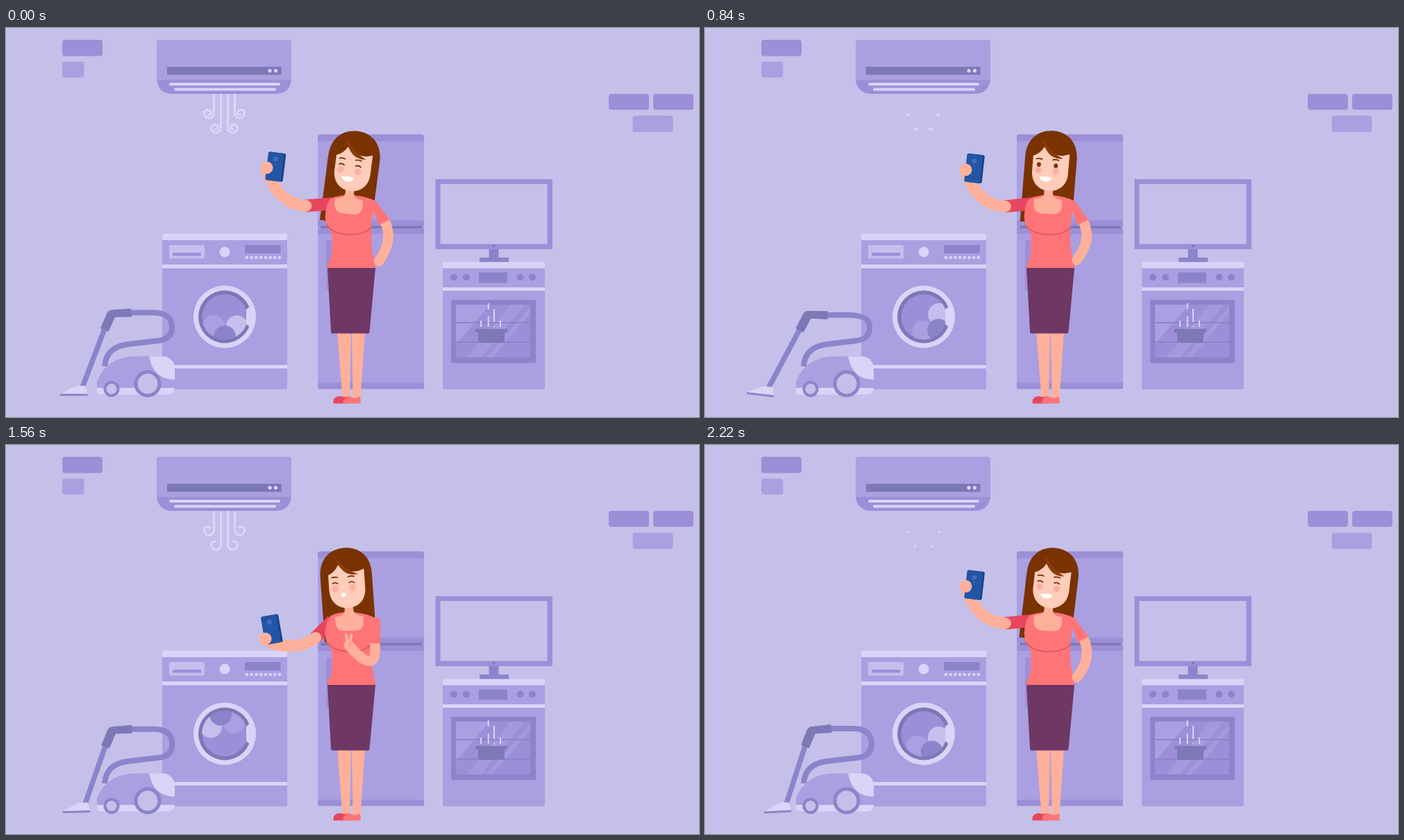
Write an HTML page that moves like this. It is 998 by 561 pixels and loops after 2.25 s.

```html
<!DOCTYPE html>
<html lang="en">
<head>
<meta charset="utf-8">
<title>Selfie at home</title>
<style>
  html, body { margin: 0; width: 100%; height: 100%; overflow: hidden; background: #c5c0e9; }
  svg { display: block; width: 100vw; height: 100vh; }
  .bg { fill: #c5c0e9; }
  .base { fill: #aa9fe1; }
  .mid { fill: #9c8fd8; }
  .deep { fill: #8c84cb; }
  .dark { fill: #7d78b6; }
  .pale { fill: #d9d4f8; }
  .skin { fill: #ffb09a; }
  .pink { fill: #ff7477; }
  .red { fill: #e8455f; }
  .hair { fill: #7a3200; }
  .line { fill: none; }
  .hose { stroke: #8c84cb; stroke-width: 8; }
  .limb { stroke: #ffb09a; stroke-linecap: round; }
  .air { stroke: #dbd7f8; stroke-width: 2.8; }
  .steam { stroke: #d9d4f8; stroke-width: 2; }
  .ink { stroke: #6e2c04; stroke-width: 1.7; stroke-linecap: round; }
</style>
</head>
<body>
<svg viewBox="0 0 998 561" preserveAspectRatio="none">
  <defs>
    <clipPath id="glass"><circle cx="315" cy="416.5" r="33"/></clipPath>
    <clipPath id="window"><rect x="648" y="399" width="107" height="76"/></clipPath>
    <linearGradient id="glow" gradientUnits="userSpaceOnUse" x1="10" y1="0" x2="75" y2="-8">
      <stop offset="0" stop-color="#fff" stop-opacity=".5"/>
      <stop offset=".75" stop-color="#fff" stop-opacity=".48"/>
      <stop offset="1" stop-color="#fff" stop-opacity="0"/>
    </linearGradient>
    <filter id="soft"><feGaussianBlur stdDeviation="1.3"/></filter>
    <path id="swirlOut" d="M299.5 95V123a7 7 0 0 1-14 0a5 5 0 0 1 10 0a3 3 0 0 1-5 1.5"/>
    <path id="swirlIn" d="M309.5 95V144a7 7 0 0 1-14 0a5 5 0 0 1 10 0a3 3 0 0 1-5 1.5"/>
  </defs>

  <rect class="bg" width="998" height="561"/>

  <!-- bricks -->
  <g class="mid">
    <rect x="81" y="17" width="58" height="23.500" rx="4"/>
    <rect x="868" y="95" width="58" height="23" rx="4"/>
    <rect x="932" y="95" width="58" height="23" rx="4"/>
  </g>
  <g class="base">
    <rect x="81" y="48.500" width="31.500" height="23" rx="4"/>
    <rect x="902.500" y="126.500" width="58" height="23.500" rx="4"/>
  </g>

  <!-- air conditioner -->
  <path class="base" d="M217 76V21q0-4 4-4H407q4 0 4 4V76Z"/>
  <path class="mid" d="M217 75H411Q408 95 388 95H240Q220 95 217 75Z"/>
  <rect class="dark" x="232" y="56" width="164.500" height="11.500"/>
  <g class="pale">
    <circle cx="380" cy="61.700" r="2.600"/><circle cx="388.500" cy="61.700" r="2.600"/>
    <rect x="235" y="79" width="160" height="4" rx="2"/>
    <rect x="242" y="86.500" width="147" height="4" rx="2"/>
  </g>
  <g id="air" class="line air"></g>

  <!-- washing machine -->
  <rect class="base" x="225" y="304" width="180" height="217" rx="2"/>
  <g class="pale">
    <rect x="225" y="296.500" width="180" height="9.500" rx="2"/>
    <rect x="225" y="341" width="180" height="5.500"/>
    <rect x="225" y="486" width="180" height="5"/>
    <circle cx="315" cy="323" r="7.500"/>
  </g>
  <rect x="235" y="313" width="51" height="19.500" rx="2" fill="#c5bfee"/>
  <rect class="mid" x="240" y="324" width="41" height="4.500"/>
  <rect class="deep" x="344" y="313" width="51.500" height="12"/>
  <path class="line" d="M347 331H394" stroke="#d9d4f8" stroke-width="4.600" stroke-linecap="round" stroke-dasharray="0 6.700"/>
  <circle class="pale" cx="315" cy="416.500" r="45"/>
  <circle class="dark" cx="315" cy="416.500" r="38"/>
  <circle class="mid" cx="315" cy="416.500" r="32.500"/>
  <g clip-path="url(#glass)">
    <g id="drum">
      <circle class="base" cx="299" cy="430" r="16"/>
      <circle cx="332.500" cy="430.500" r="16" fill="#c5bfee"/>
      <circle class="deep" cx="315" cy="445" r="16"/>
    </g>
  </g>
  <path class="pale" d="M355 398L346 406V427L355 435Z"/>

  <!-- fridge -->
  <rect class="base" x="449" y="153.500" width="153" height="367" rx="3"/>
  <g class="mid">
    <path d="M449 163.500V157q0-3.500 3.500-3.500H598.500q3.500 0 3.500 3.500v6.500Z"/>
    <rect x="449" y="277.500" width="153" height="9" rx="2"/>
    <rect x="449" y="288.500" width="153" height="8.500" rx="2"/>
    <rect x="449" y="511.500" width="153" height="9" rx="2"/>
    <rect x="461" y="185" width="8" height="72" rx="3"/>
    <rect x="461" y="306" width="8" height="72" rx="3"/>
  </g>
  <rect class="dark" x="453" y="285.500" width="146" height="3.500"/>

  <!-- television -->
  <rect class="mid" x="618.500" y="218" width="168.500" height="101" rx="1"/>
  <rect class="bg" x="625.500" y="225" width="154" height="86.500"/>
  <circle class="dark" cx="702.500" cy="314.500" r="2"/>
  <rect class="deep" x="695.500" y="319" width="14" height="13"/>
  <rect class="deep" x="682" y="331" width="42" height="7"/>

  <!-- oven -->
  <rect class="base" x="629" y="345" width="147" height="176" rx="2"/>
  <rect class="pale" x="629" y="337.500" width="147" height="9" rx="2"/>
  <rect class="pale" x="629" y="374" width="147" height="5"/>
  <g class="deep">
    <circle cx="645" cy="359.500" r="5"/><circle cx="663" cy="359.500" r="5"/>
    <circle cx="740.500" cy="359.500" r="5"/><circle cx="758" cy="359.500" r="5"/>
    <rect x="681" y="352.500" width="41" height="15"/>
    <rect x="641" y="392" width="122" height="91" rx="2"/>
  </g>
  <rect class="mid" x="648" y="399" width="107" height="76"/>
  <g class="base" clip-path="url(#window)">
    <path d="M648 399H697L648 456Z"/>
    <path d="M727 399H747L684 475H664Z" opacity=".7"/>
    <path d="M755 402V411L701 475H692Z" opacity=".7"/>
  </g>
  <path class="line" d="M648 425H755M648 453H755" stroke="#8c84cb" stroke-width="2"/>
  <path class="dark" d="M676 434H722V439H718V450Q718 454 714 454H684Q680 454 680 450V439H676Z"/>
  <g id="steam" class="line steam">
    <path d="M684 431V412" stroke-dasharray="9 16"/>
    <path d="M694.700 431V397" stroke-dasharray="15 10"/>
    <path d="M703 431V405" stroke-dasharray="19 6" data-shift="-7"/>
    <path d="M712 431V412" stroke-dasharray="9 16"/>
  </g>

  <!-- vacuum cleaner -->
  <path id="hose" class="line hose"/>
  <path id="wand" class="line" stroke="#8c84cb" stroke-width="7.500"/>
  <path id="grip" class="dark" d="M180 404.500L152 406.500Q147 407 145 412L136 433L147.500 438L157 417L181 416.500Z"/>
  <g id="nozzle">
    <path class="pale" d="M78 528L101 516H114L118 528Z"/>
    <rect class="deep" x="78" y="527.500" width="39.500" height="3"/>
  </g>
  <path class="base" d="M131 521V509Q146 473.500 187 473.500H222Q243 475 243 496V521Z"/>
  <path class="pale" d="M131 519H243Q242 528.500 233 528.500H135Q131 528 131 524Z"/>
  <path class="pale" d="M206 473.500H226Q241 475 243 490V507Q212 507 206 473.500Z"/>
  <g class="bg" stroke="#8c84cb">
    <circle cx="204" cy="513" r="17" stroke-width="5"/>
    <circle cx="152" cy="520.500" r="9.500" stroke-width="4"/>
  </g>

  <!-- woman -->
  <g id="backHair"><path class="hair" d="M-37.500 37V-57C-37.500 -84 -20 -97 0 -97S37 -84 37 -57V6H0L-25 37Z"/></g>
  <path class="skin" d="M477 438H497L495 532Q489.500 536 484.500 532Z"/>
  <path class="skin" d="M498 438H517L510.500 532Q505 536 499.500 532Z"/>
  <path class="red" d="M471.500 541.500V539Q472 531 481 531Q488 533 494 531V541.500Z"/>
  <path class="pink" d="M485.500 541.500Q485 531.500 496 531.500Q503 536 510 531L511 541.500Z"/>
  <path id="sleeveL" class="line" stroke="#e8455f" stroke-width="18"/>
  <path class="pink" d="M468 246Q478 241 494 241T527 247Q533 252 528 270Q527 281 526 290L526.500 316L532.500 347H463V342Q470 329 469.500 318V297Q458 283 460 268Q461 252 468 246Z"/>
  <path class="line" d="M462 284Q470 297 495 298Q518 298 526 287" stroke="#dd5765" stroke-width="1.800"/>
  <path id="neckline" class="skin" d="M474 247Q488 246 488 238V226H500.500V238Q501 246 514 247Q517 268 503 268H485Q472 267 474 247Z"/>
  <path d="M463 346H532L523.500 438Q523 440.500 521 440.500H470Q468 440.500 468 438Z" fill="#6f3764"/>
  <g id="head">
    <path d="M-26 -59Q-16 -63 -11 -73Q-3 -62 16 -62L26 -65V-37C26 -20 14 -10 0 -10S-26 -20 -26 -37Z" fill="#ffcdb9"/>
    <path d="M-16 -89Q-5 -67 17 -58Q4 -56 -4 -64Q-13 -73 -16 -89Z" fill="#8a3c08"/>
    <circle cx="-17.200" cy="-39" r="4.700" fill="#ffada0"/>
    <circle cx="7.800" cy="-39" r="4.700" fill="#ffada0"/>
    <path class="line ink" d="M-21 -55Q-17 -56.500 -13 -55M2.500 -55Q6.500 -56.500 11 -55"/>
    <path id="shut" class="line ink" d="M-20.500 -46.500Q-17 -49 -13 -46M3.500 -46.500Q7 -49 11 -46"/>
    <g id="eyes" class="hair">
      <ellipse cx="-17" cy="-47" rx="3"/>
      <ellipse cx="7.500" cy="-47" rx="3"/>
    </g>
    <path id="mouth" fill="#fff"/>
  </g>
  <path id="armR" class="line limb" stroke-width="14.500"/>
  <path id="fingers" class="line limb" stroke-width="4.300"/>
  <path id="thumb" class="line" stroke="#ef957f" stroke-width="1.200" stroke-linecap="round" d="M-3 -1L2 -3L2 2"/>
  <path id="sleeveR" class="pink"/>
  <path id="armL" class="line limb" stroke-width="16.500"/>
  <g id="phone">
    <path id="beam" d="M10 -19L62 -67L82 -30L80 42L10 20Z" fill="url(#glow)" filter="url(#soft)"/>
    <rect x="-12" y="-20.500" width="25" height="41" rx="2.500" fill="#173f80"/>
    <rect x="-12.500" y="-20.500" width="23" height="41" rx="2.500" fill="#2355a5"/>
    <circle cx="-1" cy="-11" r="3.500" fill="#3f6dc0"/>
    <circle cx="-1" cy="-4" r="1" fill="#3f6dc0"/>
  </g>
  <circle id="hand" class="skin" r="9"/>
</svg>
<script>
const LOOP = 2250, STEP = 30;
const el = id => document.getElementById(id);
const set = (node, attrs) => { for (const k in attrs) node.setAttribute(k, attrs[k]); };
const clamp = x => Math.min(1, Math.max(0, x));
const ramp = (t, a, b) => clamp((t - a) / (b - a));
const ease = (t, a, b) => { const s = ramp(t, a, b); return s * s * (3 - 2 * s); };
const mix = (a, b, p) => a + (b - a) * p;
const pulse = (t, a, b, c, d) => ramp(t, a, b) - ramp(t, c, d);
const blend = (a, b, p) => a.map((v, i) => mix(v, b[i], p));
const curve = n => `M${n[0]} ${n[1]}C${n.slice(2)}`;

// two poses: phone held high with hand on hip / phone low with a peace sign
const armL = [[376, 203, 386, 240, 408, 255, 432, 256.5], [374, 281, 395, 293, 425, 294, 446, 278]];
const armR = [[544, 276, 555, 295, 552, 315, 537, 336.5], [531, 283, 535, 318, 522, 322, 494, 289]];
const cuffL = [[431, 256.5, 474, 253], [444, 279.5, 470, 253]];
const cuffR = [[524, 250, 534, 246, 552.5, 276, 537, 284.5], [524, 250, 539, 247, 539, 286, 524, 286]];
const wandX = [0, 7.5, -22, 7, 0, 7.5];

for (const id of ['swirlOut', 'swirlIn'])
  for (const flip of ['', 'matrix(-1 0 0 1 629 0)']) {
    const p = el(id).cloneNode();
    p.removeAttribute('id');
    set(p, { pathLength: 100, transform: flip });
    el('air').append(p);
  }

function drawAir(t) {
  const c = t % 1350;
  const end = t < 1350 ? 100 : 100 * ease(t, 1350, 1620);
  const start = Math.min(99.2, 100 * ease(c, 240, 960));
  const len = Math.max(0, end - start);
  for (const p of el('air').children)
    set(p, { 'stroke-dasharray': `0 ${start} ${len} 200`, visibility: len ? 'visible' : 'hidden' });
}

function drawSteam(t) {
  const rise = 25 * ease(t, 0, 760);
  for (const p of el('steam').children)
    set(p, { 'stroke-dashoffset': +(p.dataset.shift || 0) - rise });
}

function drawVacuum(t) {
  const i = Math.floor(t / 450), d = mix(wandX[i], wandX[i + 1], t / 450 - i);
  const x = d * .22, y = -d * .2, r = d * .1;
  set(el('grip'), { transform: `translate(${x} ${y}) rotate(${-d * .25} 178 411)` });
  set(el('wand'), { d: `M${142 + d * .32} ${434 - d * .06}L${110 + d} 518` });
  set(el('nozzle'), { transform: `translate(${d} 0) rotate(${-d * .38} 98 529)` });
  set(el('hose'), { d: `M${179 + x} ${410.5 + y}L${212 + x} ${410.5 + y}Q${239 + r} ${411 + y} ${239 + r} 431
    Q${239 + r} 449 ${219 + r} 451L176 456Q144 460 142 488` });
}

function drawWoman(t) {
  const lean = ease(t, 640, 1250) - ease(t, 1750, 2300);
  const p = ease(t, 780, 1290) - ease(t, 1790, 2270);
  const tilt = mix(7.5, -4, lean);
  const pose = `translate(494 245) rotate(${tilt})`;
  set(el('head'), { transform: pose });
  set(el('backHair'), { transform: pose });
  set(el('neckline'), { transform: `rotate(${tilt * .6} 494 245)` });

  const open = pulse(t, 570, 630, 930, 1020) + pulse(t, 1830, 1890, 2070, 2160);
  for (const e of el('eyes').children) set(e, { ry: 3.2 * open });
  set(el('shut'), { opacity: open > .3 ? 0 : 1 });

  const w = mix(8.8, 3.6, p), top = mix(-2.5, -4.5, p), low = mix(7.5, 5, p);
  set(el('mouth'), {
    d: `M${-w} -1Q0 ${top} ${w} -1C${w} ${low} ${-w} ${low} ${-w} -1Z`,
    transform: `translate(-5.7 ${mix(-28.5, -29.8, p)})`
  });

  const left = blend(...armL, p), right = blend(...armR, p), hx = right[6], hy = right[7];
  set(el('armL'), { d: curve(left) });
  set(el('armR'), { d: curve(right) });
  set(el('hand'), { cx: left[0] - .5, cy: left[1] - 1.5 });
  const s = blend(...cuffL, p), c = blend(...cuffR, p);
  set(el('sleeveL'), { d: `M${s[0]} ${s[1]}L${s[2]} ${s[3]}` });
  set(el('sleeveR'), { d: `M${c[0]} ${c[1]}Q${c[2] - 5} ${c[3] - 1} ${c[2]} ${c[3] + 6}L${c[4]} ${c[5]}L${c[6]} ${c[7]}Z` });
  const turn = `translate(${hx} ${hy}) rotate(${-90 * (1 - p)})`, reach = -15 * p;
  set(el('fingers'), { d: `M-2 0L${-4 * p} ${reach}M0 0L${3.5 * p} ${reach}`, transform: turn });
  set(el('thumb'), { transform: turn, opacity: ramp(p, .5, .8) });

  set(el('phone'), { transform: `translate(${mix(388, 382.5, p)} ${mix(200, 266, p)}) rotate(${mix(7, -10, p)})` });
  set(el('beam'), { opacity: pulse(t, 300, 360, 420, 510) + pulse(t, 1290, 1350, 1410, 1500) });
}

let origin;
function frame(now) {
  origin ??= now;
  const t = Math.floor((now - origin) % LOOP / STEP) * STEP;
  set(el('drum'), { transform: `rotate(${t * .8} 315 416.5)` });
  drawAir(t);
  drawSteam(t);
  drawVacuum(t);
  drawWoman(t);
  requestAnimationFrame(frame);
}
requestAnimationFrame(frame);
</script>
</body>
</html>
```
